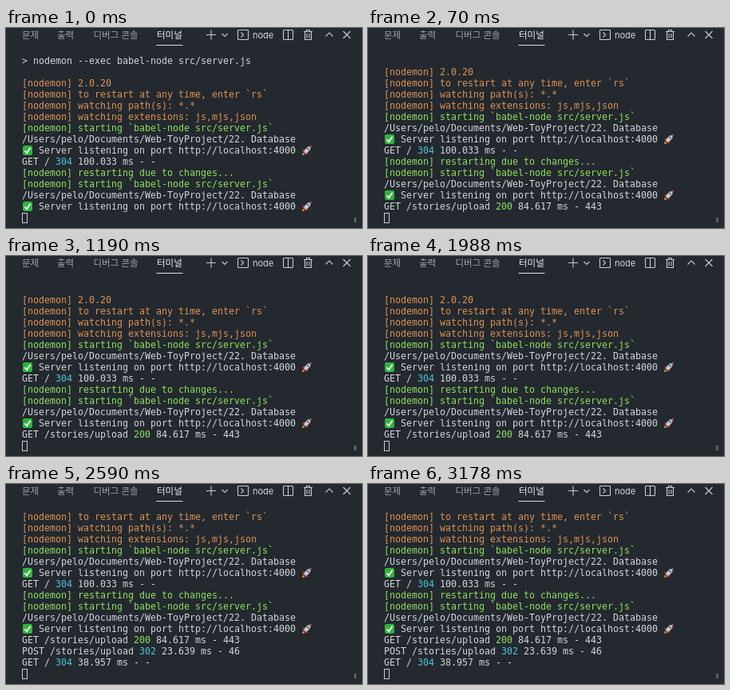
Recreate the animation shown at these times as an HTML page. Size 446 px wide and 250 px high, loop 3570 ms.

```html
<!DOCTYPE html>
<html lang="ko">
<head>
<meta charset="utf-8">
<title>Terminal</title>
<style>
  html, body { margin: 0; width: 100%; height: 100%; overflow: hidden; background: #23292f; }
  .stage { position: relative; width: 446px; height: 250px; overflow: hidden; }
  .bar { position: absolute; left: 0; top: 0; }
  .tab { font: 11.5px "Noto Sans CJK KR", "Noto Sans CJK", sans-serif; fill: #a0a5aa; }
  .tab.on { fill: #eceeef; }
  .shell { font: 11px Inter, sans-serif; fill: #d3d6d9; }
  .icon { fill: none; stroke: #c8ccd0; stroke-width: 1.1; }
  .view { position: absolute; left: 20px; top: 34px; width: 410px; height: 196px; overflow: hidden; }
  .log {
    margin: 0; color: #d2d6da;
    font: 11.63px/14px "DejaVu Sans Mono", monospace;
    font-variant-ligatures: none;
    animation: scroll 3570ms step-end infinite;
  }
  .log svg { width: 14px; height: 14px; vertical-align: top; }
  .o { color: #e0924f; }
  .g { color: #8fe05c; }
  .c { color: #4cc4d6; }
  .cursor {
    position: absolute; left: 20px; top: 231px; width: 7px; height: 13px;
    box-sizing: border-box; border: 1px solid #c8ccd0;
  }
  .thumb { position: absolute; left: 436px; top: 237px; width: 3px; height: 6px; background: #5b6066; }
  /* one 14px row per new line of output: at 70, 2520 and 2590 ms */
  @keyframes scroll {
    0% { transform: translateY(0); }
    1.9608% { transform: translateY(-14px); }
    70.5882% { transform: translateY(-28px); }
    72.549%, 100% { transform: translateY(-42px); }
  }
</style>
</head>
<body>
<div class="stage">
  <svg class="bar" width="446" height="30">
    <defs>
      <symbol id="check" viewBox="0 0 14 14">
        <rect x="1" y="1" width="12" height="12" rx="2" fill="#2fb53c"/>
        <path d="M3.5 7.4 6 10.2 10.6 3.8" fill="none" stroke="#fff" stroke-width="1.9"/>
      </symbol>
      <symbol id="rocket" viewBox="0 0 14 14">
        <path d="M1 13 2 9.4 4.6 12Z" fill="#f3a533"/>
        <path d="M5.5 5.2 2.4 6.2 1.6 9 4.5 8ZM8.8 8.5 7.8 11.6 5 12.4 6 9.5Z" fill="#d5423c"/>
        <path d="M3.2 9 Q5.2 2.8 12.6 1.2 Q11.2 8.8 5 10.8Z" fill="#c9d2da"/>
        <path d="M9.6 2.2 12.6 1.2 11.8 4.4Z" fill="#d5423c"/>
        <circle cx="8.4" cy="5.4" r="1.3" fill="#41708f"/>
      </symbol>
    </defs>
    <text class="tab" x="20" y="13">문제</text>
    <text class="tab" x="64" y="13">출력</text>
    <text class="tab" x="109.500" y="13">디버그 콘솔</text>
    <text class="tab on" x="189" y="13">터미널</text>
    <path d="M188.500 21.500H221.500" stroke="#d9dcdf"/>
    <text class="shell" x="309" y="12.500">node</text>
    <g class="icon">
      <path d="M251 8.500H263M257 2.500V14.500"/>
      <path d="M270.500 7 274 10.500 277.500 7"/>
      <rect x="290.500" y="2.500" width="13" height="12" rx="1"/>
      <path d="M294.500 5.500 297.500 8.500 294.500 11.500"/>
      <rect x="347.500" y="2.500" width="12" height="12" rx="1"/>
      <path d="M353.500 2.500V14.500"/>
      <path d="M373 4.500H384M376.500 4.500V2.500H380.500V4.500M374.500 4.500V14.500H382.500V4.500M377 7V12.500M380 7V12.500"/>
      <path d="M400.500 10.500 405 6 409.500 10.500"/>
      <path d="M422.500 4 431.500 13M431.500 4 422.500 13"/>
    </g>
  </svg>
  <div class="view"><pre class="log">&gt; nodemon --exec babel-node src/server.js

<span class="o">[nodemon] 2.0.20
[nodemon] to restart at any time, enter `rs`
[nodemon] watching path(s): *.*
[nodemon] watching extensions: js,mjs,json</span>
<span class="g">[nodemon] starting `babel-node src/server.js`</span>
/Users/pelo/Documents/Web-ToyProject/22. Database
<svg><use href="#check"/></svg> Server listening on port http://localhost:4000 <svg><use href="#rocket"/></svg>
GET / <span class="c">304</span> 100.033 ms - -
<span class="g">[nodemon] restarting due to changes...
[nodemon] starting `babel-node src/server.js`</span>
/Users/pelo/Documents/Web-ToyProject/22. Database
<svg><use href="#check"/></svg> Server listening on port http://localhost:4000 <svg><use href="#rocket"/></svg>
GET /stories/upload <span class="g">200</span> 84.617 ms - 443
POST /stories/upload <span class="c">302</span> 23.639 ms - 46
GET / <span class="c">304</span> 38.957 ms - -
</pre></div>
  <div class="cursor"></div>
  <div class="thumb"></div>
</div>
</body>
</html>
```
